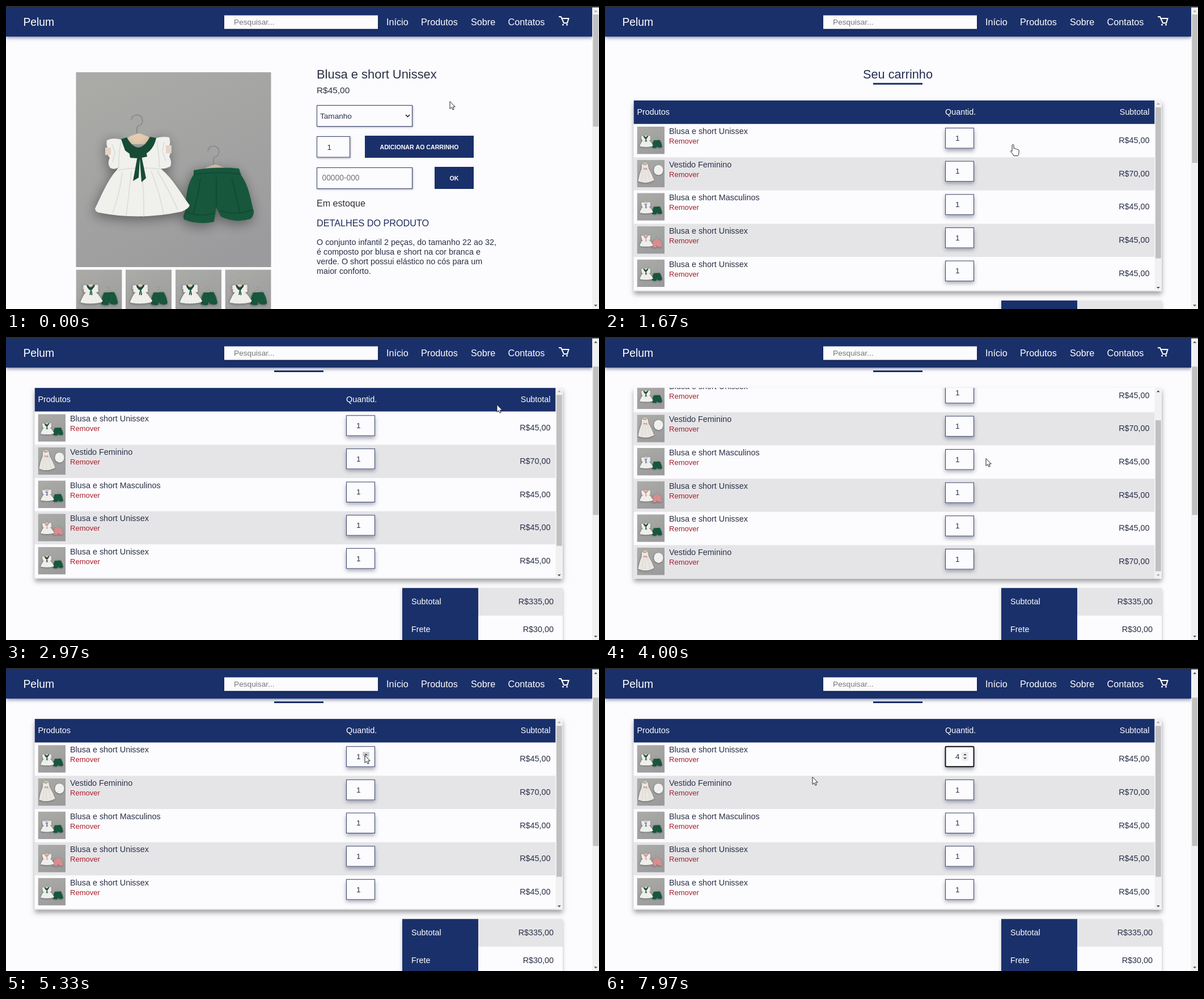
Recreate the animation shown at these times as an HTML page with a canvas. Size 1046 by 535 pixels, loop 8 s.

```html
<!DOCTYPE html>
<html lang="pt-BR">
<head>
<meta charset="utf-8">
<title>Loja infantil</title>
<style>
html, body { margin: 0; width: 100%; height: 100%; overflow: hidden; background: #fcfcfe; }
canvas { display: block; }
</style>
</head>
<body>
<canvas id="stage" width="1046" height="535"></canvas>
<script>
const ctx = document.getElementById('stage').getContext('2d');
const LOOP = 8000, CART_AT = 1560;
const NAVY = '#1a306a', INK = '#2a3046', PAPER = '#fcfcfe', STRIPE = '#e5e5e8';
const CLICKS = [5650, 6050, 6450];

// time, x, y of the pointer tip
const POINTER = [
  [0, 783, 168], [250, 783, 168], [800, 720, 246], [1650, 720, 246],
  [2250, 740, 113], [2520, 740, 113], [2900, 866, 119], [3050, 866, 119],
  [3550, 672, 214], [4500, 672, 214], [5150, 633, 154], [6750, 633, 154],
  [7600, 366, 192], [8000, 366, 192]
];
const PAGE_SCROLL = [[2540, 0], [2780, 76.8]];
const LIST_SCROLL = [[3560, 0], [3800, 57.5], [4250, 57.5], [4490, 0]];

const ROWS = [
  ['Blusa e short Unissex', 'R$45,00', 'green'],
  ['Vestido Feminino', 'R$70,00', 'dress'],
  ['Blusa e short Masculinos', 'R$45,00', 'boy'],
  ['Blusa e short Unissex', 'R$45,00', 'pink'],
  ['Blusa e short Unissex', 'R$45,00', 'green'],
  ['Vestido Feminino', 'R$70,00', 'dress']
];

// Eased interpolation between [time, ...values] keys
function at(keys, t) {
  const i = keys.findIndex(k => k[0] > t);
  if (i === 0) return keys[0].slice(1);
  if (i < 0) return keys[keys.length - 1].slice(1);
  const a = keys[i - 1], b = keys[i];
  const u = (t - a[0]) / (b[0] - a[0]), e = u * u * (3 - 2 * u);
  return a.slice(1).map((v, n) => v + (b[n + 1] - v) * e);
}

function rect(x, y, w, h, fill) {
  ctx.fillStyle = fill;
  ctx.fillRect(x, y, w, h);
}

function shadowed(dx, dy, blur, color, draw) {
  ctx.save();
  Object.assign(ctx, { shadowOffsetX: dx, shadowOffsetY: dy, shadowBlur: blur, shadowColor: color });
  draw();
  ctx.restore();
}

function text(s, x, mid, size, color = INK, align = 'left', weight = '') {
  ctx.font = `${weight} ${size}px "Liberation Sans", Arial, sans-serif`;
  ctx.textAlign = align;
  ctx.fillStyle = color;
  ctx.fillText(s, x, mid + size * 0.35);
}

function shape(d, fill, stroke, width = 1) {
  const p = new Path2D(d);
  if (fill) { ctx.fillStyle = fill; ctx.fill(p); }
  if (stroke) { ctx.strokeStyle = stroke; ctx.lineWidth = width; ctx.stroke(p); }
}

function triangle(x, y, dir, color, r = 3) {
  shape(`M${x - r} ${y + dir * r / 2}h${2 * r}l${-r} ${-dir * r}z`, color);
}

function field(x, y, w, h, dx, dy, blur) {
  shadowed(dx, dy, blur, 'rgba(40,45,70,.42)', () => rect(x, y, w, h, PAPER));
  ctx.strokeStyle = '#38426c';
  ctx.lineWidth = 1;
  ctx.strokeRect(x + .5, y + .5, w - 1, h - 1);
}

function button(label, x, y, w, h) {
  rect(x, y, w, h, NAVY);
  text(label, x + w / 2, y + h / 2 + .5, 10.6, '#fff', 'center', 'bold');
}

function scrollbar(x, top, bottom, thumb, size, atTop, atEnd) {
  const mid = x + 6.2;
  rect(x, top, 12.4, bottom - top, '#f1f1f2');
  rect(x + 1.4, thumb, 9.8, size, '#c0c0c1');
  triangle(mid, top + 6, 1, atTop ? '#a5a5a5' : '#484848');
  triangle(mid, bottom - 6, -1, atEnd ? '#a5a5a5' : '#484848');
}

function hanger(x, y) {
  shape(`M${x - 10} ${y - 3}a10 10 0 1 1 12 11q-3 1 -2 8v10`, null, '#858684', 1.6);
  shape(`M${x - 23} ${y + 40}q3-13 19-17q8-4 14 0q16 4 21 17z`, '#e6cdb1');
}

// Cloth with a soft shadow that keeps its size relative to the photo
function garment(d, fill, k) {
  shadowed(-2 * k, 5 * k, 22 * k, 'rgba(45,45,48,.6)', () => shape(d, fill));
}

function outfit(kind, k) {
  const trim = { green: '#174b37', pink: '#dc9a98', boy: '#d9dde5' }[kind];
  const cloth = kind === 'pink' ? '#d88f91' : '#17583d';
  const fold = kind === 'pink' ? '#c27a7e' : '#124a33';
  hanger(231, 204);
  hanger(366, 259);

  garment('M331 290Q370 283 411 287L415 299C429 318 432 345 437 362Q437 372 431 376Q405 384 379 372L371 356L367 381Q340 387 314 377Q311 371 316 363C317 340 319 314 331 298Z', cloth, k);
  shape('M331 298Q372 291 414 297M371 302L371 355M343 305Q339 336 330 366M398 304Q407 337 412 364M317 364Q344 373 368 366M377 361Q406 371 435 360',
    null, fold, 2);

  garment('M207 237Q190 231 178 237Q176 246 180 252Q177 262 183 268Q178 278 184 286Q192 290 198 285L195 290C180 306 168 335 157 358Q158 364 165 365Q236 379 310 363Q322 358 324 352C308 330 295 306 273 287Q282 288 290 283Q293 274 288 266Q292 258 287 250Q291 242 288 232Q276 229 262 234Q234 275 207 237Z',
    '#f0f0ed', k);
  shape('M203 240Q198 262 199 286M266 238Q270 262 271 285M187 244L192 258L188 276M279 240L276 256L282 274', null, '#d9dad9', 1.5);
  shape('M196 290Q234 283 274 288M205 294Q201 331 188 365M221 292Q217 331 212 370M239 291Q244 332 243 372M256 291Q272 332 278 368M267 291Q289 328 303 360',
    null, '#dadbd9', 1.5);
  shape('M175 250h10v13h-10zM282 246h10v14h-10z', '#e6d3c5');
  shape('M203 235L213 232Q234 268 254 231L265 233Q260 256 242 263Q223 267 210 255Z', trim);
  shape('M234 261L217 257L219 268L234 269L249 266L247 256ZM232 265L224 309L234 303L236 270L239 311L247 304L239 265Z',
    kind === 'boy' ? '#526c9e' : trim);
}

function dress(k) {
  hanger(222, 128);
  garment('M185 168Q222 196 256 165L270 228Q312 300 338 372Q236 430 136 384Q150 300 180 232Z', '#eae6e1', k);
  garment('M334 250Q336 184 392 182Q448 186 450 245Q446 304 392 308Q340 302 334 250Z', '#f1f1ef', k);
  shape('M182 236Q226 228 270 232M202 246L182 392M228 242V402M253 242L288 388', null, '#d2ccc6', 4);
  shape('M226 226l-23-16l4 31l20-7l23 13l-3-33z', '#d49a96');
  shape('M365 290Q398 255 428 206', null, '#d8d8d6', 4);
}

function photo(x, y, size, kind) {
  const k = size / 344;
  ctx.save();
  ctx.translate(x, y);
  ctx.scale(k, k);
  ctx.translate(-123.5, -117);
  ctx.beginPath();
  ctx.rect(123.5, 117, 344, 344);
  ctx.clip();
  const g = ctx.createLinearGradient(200, 117, 360, 461);
  g.addColorStop(0, '#aaaba7');
  g.addColorStop(1, '#9b9b9d');
  rect(123, 116, 346, 346, g);
  kind === 'dress' ? dress(k) : outfit(kind, k);
  ctx.restore();
}

function navbar() {
  shadowed(0, 2, 6, 'rgba(20,35,90,.55)', () => rect(0, 2, 1034, 52, NAVY));
  text('Pelum', 30.5, 28.5, 19.3, '#fff');
  shadowed(0, 1, 3, 'rgba(0,0,20,.5)', () => rect(385, 16.5, 271, 24, PAPER));
  text('Pesquisar...', 402, 28, 13.7, '#77777b');
  [['Início', 671], ['Produtos', 732], ['Sobre', 820], ['Contatos', 885.5]]
    .forEach(([s, x]) => text(s, x, 28, 16.2, '#fff'));
  shape('M975 19h4l5 11h6l2.5-8h-12', null, '#fff', 2);
  shape('M981 33a1.5 1.5 0 1 0 3 0a1.5 1.5 0 1 0-3 0M988 33a1.5 1.5 0 1 0 3 0a1.5 1.5 0 1 0-3 0', '#fff');
}

function productPage() {
  photo(123.5, 117, 344, 'green');
  [123.5, 211, 299, 386.5].forEach(x => photo(x, 465.5, 81, 'green'));

  text('Blusa e short Unissex', 548, 120, 21.9);
  text('R$45,00', 548, 149, 15.4);
  field(548, 175, 169, 38, 1, 1, 3);
  text('Tamanho', 554, 194, 13.6);
  shape('M705 192l3.5 3.5l3.5-3.5', null, '#222', 1.6);
  field(548, 230, 59, 37.5, 1, 1, 3);
  text('1', 566.5, 249, 13.6);
  button('ADICIONAR AO CARRINHO', 633, 229, 192, 39);
  field(548, 285, 169, 38, 1, 1, 3);
  text('00000-000', 557.5, 303.5, 13.8, '#75757a');
  button('OK', 756, 284, 69, 39);
  text('Em estoque', 548, 348.5, 16.1, '#2d302f');
  text('DETALHES DO PRODUTO', 548, 383, 16.2, '#1d2858');
  ['O conjunto infantil 2 peças, do tamanho 22 ao 32,',
    'é composto por blusa e short na cor branca e',
    'verde. O short possui elástico no cós para um',
    'maior conforto.'].forEach((s, i) => text(s, 548, 416.5 + i * 17, 14.37));
}

function quantity(y, value, hot, focused) {
  field(600, y, 51, 36.5, 0, 4, 7);
  if (focused) {
    ctx.strokeStyle = '#15171c';
    ctx.lineWidth = 2;
    ctx.beginPath();
    ctx.roundRect(600.5, y + .5, 50, 35.5, 2);
    ctx.stroke();
  }
  text(value, 618, y + 18, 13.6);
  if (hot || focused) {
    rect(629, y + 10, 12, 15.5, '#ededee');
    if (hot) rect(629, y + 10, 12, 8, '#cfcfd2');
    triangle(635, y + 14.5, 1, '#3c3c3c', 2.8);
    triangle(635, y + 21.5, -1, '#3c3c3c', 2.8);
  }
}

function cartPage(t) {
  const [scroll] = at(PAGE_SCROLL, t), [inner] = at(LIST_SCROLL, t);
  const count = 1 + CLICKS.filter(c => t >= c).length;
  ctx.save();
  ctx.translate(0, -scroll);
  text('Seu carrinho', 516.5, 120.5, 21.7, '#232d52', 'center');
  rect(473, 135.8, 87, 3, NAVY);

  shadowed(0, 5, 8, 'rgba(70,70,75,.5)', () => rect(50.5, 166.5, 931.5, 337, PAPER));
  ctx.save();
  ctx.beginPath();
  ctx.rect(50.5, 166.5, 931.5, 337);
  ctx.clip();
  ctx.translate(0, -inner);
  rect(50.5, 166.5, 919, 42, NAVY);
  text('Produtos', 56.5, 186.5, 14.37, '#fff');
  text('Quantid.', 600, 186.5, 14.37, '#fff');
  text('Subtotal', 960.5, 186.5, 14.37, '#fff', 'right');
  ROWS.forEach(([name, price, kind], i) => {
    const y = 208.5 + i * 58.65;
    rect(50.5, y, 919, 58.65, i % 2 ? STRIPE : PAPER);
    photo(56.5, y + 4.5, 48.5, kind);
    text(name, 113, y + 12.5, 14.37);
    text('Remover', 113, y + 30, 13.05, '#a71f2b');
    const hot = !i && t > 5050 && t < 6850;
    quantity(y + 6.5, i ? '1' : String(count), hot, !i && count > 1);
    text(price, 960.5, y + 28.5, 14.37, INK, 'right');
  });
  ctx.restore();
  scrollbar(969.6, 166.5, 503.5, 179 + inner * .78, 266.5, inner < 1, inner > 57);

  shadowed(0, 3, 6, 'rgba(70,70,75,.35)', () => rect(699, 520, 283, 147, PAPER));
  rect(699, 520, 134, 147, NAVY);
  rect(833, 520, 149, 48.7, STRIPE);
  [['Subtotal', 'R$335,00'], ['Frete', 'R$30,00']].forEach(([name, price], i) => {
    text(name, 715, 544 + i * 49, 14.37, '#fff');
    text(price, 966, 544 + i * 49, 14.37, INK, 'right');
  });
  ctx.restore();
  return scroll;
}

function pointer(t) {
  const [x, y] = at(POINTER, t);
  const hand = t < CART_AT + 150 && x > 633 && x < 825 && y > 229 && y < 268;
  ctx.save();
  ctx.translate(x, y);
  ctx.lineJoin = 'round';
  if (hand) {
    shape('M-2 0q1.5-2 3 0v6q2-1 3 1q2-1 3 1q2-1 3 1v5q0 3-2 5h-7q-2-4-5-7q-1-2 1-2l1 1z', '#fff', '#222', 1);
  } else {
    shape('M0 .5V13.5L3 10.8L5 15.2L7.2 14.2L5.2 10H9.3Z', '#fff', '#20222a', 1);
  }
  ctx.restore();
}

function frame(now) {
  const t = now % LOOP, cart = t >= CART_AT;
  rect(0, 0, 1046, 535, PAPER);
  let scroll = 0;
  if (cart) scroll = cartPage(t);
  else productPage();
  navbar();
  scrollbar(1034, 3, 535, 15 + scroll * .485, cart ? 262 : 198, scroll < 1, false);
  rect(0, 0, 1046, 2.5, '#2b2e36');
  pointer(t);
  requestAnimationFrame(frame);
}
requestAnimationFrame(frame);
</script>
</body>
</html>
```
